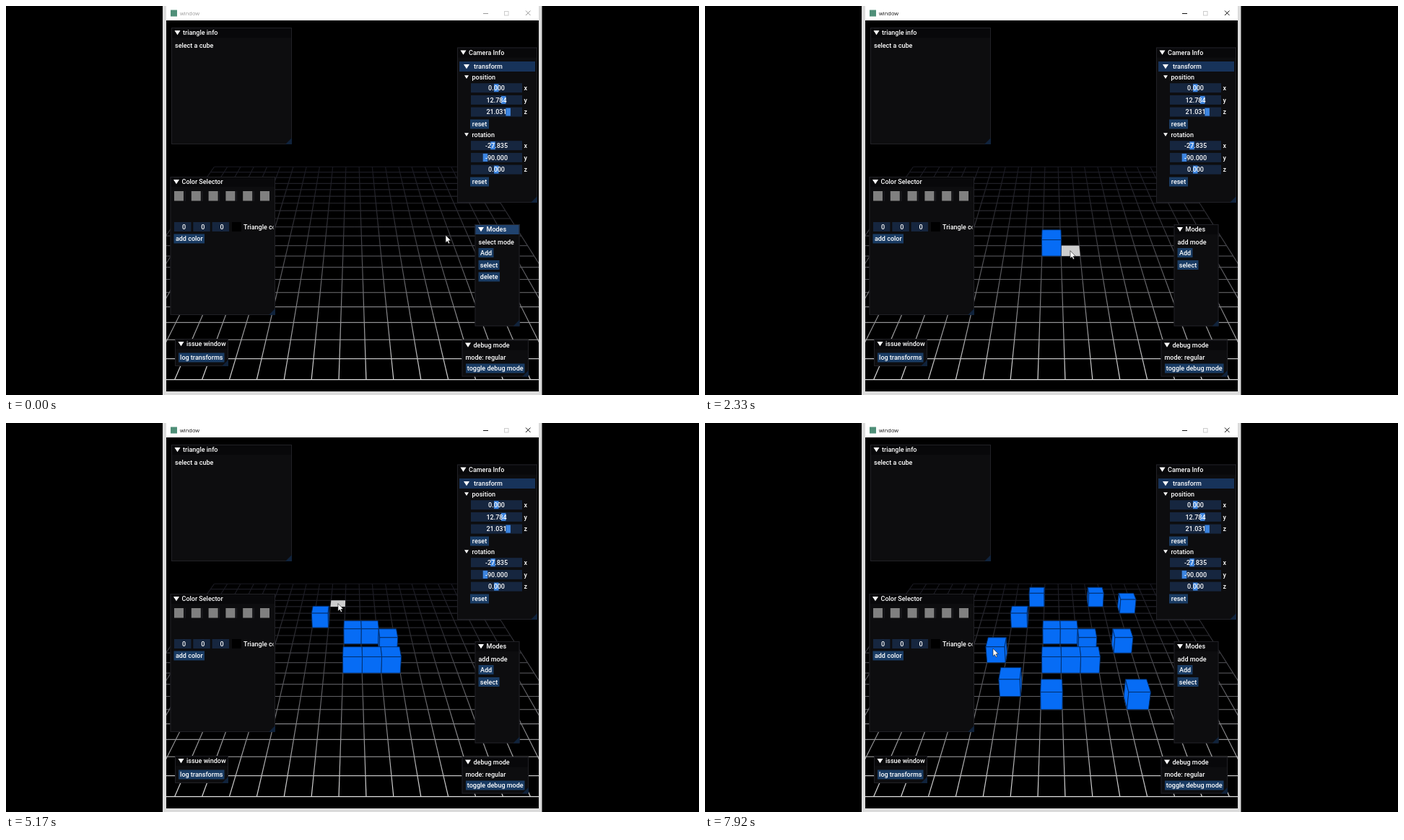
An HTML page with a canvas for the animation above (8 s loop, 960 px wide and 540 px high).

```html
<!DOCTYPE html>
<html lang="en">
<head>
<meta charset="utf-8">
<title>Cube editor</title>
<style>
  html, body { margin: 0; width: 100%; height: 100%; overflow: hidden; background: #000; }
  canvas { display: block; }
</style>
</head>
<body>
<canvas id="stage" width="960" height="540"></canvas>
<script>
const ctx = document.getElementById('stage').getContext('2d');
const LOOP = 8000, STEP = 250 / 3;
const ADD_CLICK = 1080;

const COLOR = {
  text: '#fff', panel: '#0d0d0f', title: '#08080a', activeTitle: '#20436f', border: '#212126',
  grip: '#10233c', field: '#16263f', button: '#1a3c64', hover: '#4296fa', header: '#17335a',
  grab: '#3d85e0', swatch: '#808080', cube: '#066cf5', edge: '#032c66', tile: '#cdcdcd',
};

// Perspective camera, 45 degree field of view
const VIEW = { x: 222, y: 20, w: 516, h: 515 };
const CX = 480, CY = 277.5, FOCAL = VIEW.h / 2 / Math.tan(Math.PI / 8);
const CAM_Y = 12.784, CAM_Z = 21.031, PITCH = 27.835 * Math.PI / 180;
const SIN = Math.sin(PITCH), COS = Math.cos(PITCH);
const GRID_MIN = -10.5, GRID_MAX = 9.5, FLOOR = -0.5;

function project(x, y, z) {
  const g = CAM_Z - z, h = CAM_Y - y, depth = g * COS + h * SIN;
  return [CX + FOCAL * x / depth, CY + FOCAL * (h * COS - g * SIN) / depth];
}

function floorCell([sx, sy]) {
  const v = (sy - CY) / FOCAL;
  const depth = (CAM_Y - FLOOR) / (SIN + v * COS);
  const z = CAM_Z - depth * (COS - v * SIN);
  return [Math.round((sx - CX) * depth / FOCAL), Math.round(z)];
}

// Cubes are placed at a steady pace per run; `hold` is the share of a gap
// that the pointer rests before it leaves for the next cell.
const runs = [
  { start: 1910, gap: 475, hold: 0.45,
    cells: [[0, 1], [1, 1], [2, 1], [2, -1], [1, -2], [0, -2], [-2, -4], [-1, -7]] },
  { start: 5535, gap: 290, hold: 0.2, cells: [[3, -7], [5, -6], [4, -1], [4, 4]] },
  { start: 6910, gap: 420, hold: 0, cells: [[0, 4], [-2, 3], [-3, 0]] },
];
const cubes = runs.flatMap(({ start, gap, hold, cells }) =>
  cells.map(([x, z], i) => ({ x, z, hold, time: start + i * gap })));

const pointerStart = [609, 318];
const moves = [
  { from: 250, to: 750, point: [659, 340] },
  ...cubes.map(({ x, z, hold, time }, i) => {
    const previous = i ? cubes[i - 1].time : ADD_CLICK;
    const at = share => previous + share * (time - previous);
    return { from: at(i ? hold : 0.05), to: at(i ? 0.68 : 0.8), point: project(x, FLOOR, z) };
  }),
  { from: 7770, to: 7900, point: [399, 313] },
];

function pointerAt(t) {
  return moves.reduce(([x, y], { from, to, point }) => {
    const k = Math.min(1, Math.max(0, (t - from) / (to - from)));
    const e = k * k * (3 - 2 * k);
    return [x + (point[0] - x) * e, y + (point[1] - y) * e];
  }, pointerStart);
}

function rect(x, y, w, h, color) {
  ctx.fillStyle = color;
  ctx.fillRect(x, y, w, h);
}

function polygon(points, fill, stroke) {
  ctx.beginPath();
  points.forEach(p => ctx.lineTo(...p));
  ctx.closePath();
  ctx.fillStyle = fill;
  ctx.fill();
  if (stroke) {
    ctx.strokeStyle = stroke;
    ctx.stroke();
  }
}

function line(a, b) {
  ctx.beginPath();
  ctx.moveTo(...a);
  ctx.lineTo(...b);
  ctx.stroke();
}

function text(str, x, yMid, align = 'left') {
  ctx.font = '500 9px Roboto, sans-serif';
  ctx.textAlign = align;
  ctx.fillStyle = COLOR.text;
  ctx.fillText(str, x, yMid + 3.2);
}

function arrow(x, y, r = 4) {
  polygon([[x - r, y - r * 0.75], [x + r, y - r * 0.75], [x, y + r * 0.8]], COLOR.text);
}

function button(label, x, yMid, w, color = COLOR.button) {
  rect(x, yMid - 6.5, w, 13, color);
  text(label, x + w / 2, yMid, 'center');
}

function panel(title, x, y, w, h, active) {
  rect(x, y, w, h, COLOR.panel);
  rect(x, y, w, 14, active ? COLOR.activeTitle : COLOR.title);
  ctx.strokeStyle = COLOR.border;
  ctx.lineWidth = 1;
  ctx.strokeRect(x + 0.5, y + 0.5, w - 1, h - 1);
  polygon([[x + w, y + h - 9], [x + w, y + h], [x + w - 9, y + h]], COLOR.grip);
  arrow(x + 8.5, y + 7);
  text(title, x + 16, y + 7);
}

function drawWindow(active) {
  const ink = active ? '#111' : '#999';
  rect(0, 0, 960, 540, '#000');
  rect(217, 0, 525.5, 540, '#dcdcdc');
  rect(222, 0, 516, 20, '#fff');
  rect(VIEW.x, VIEW.y, VIEW.w, VIEW.h, '#000');
  rect(228, 5.5, 9, 9, '#4f8f78');
  ctx.font = '7.5px "Open Sans", sans-serif';
  ctx.textAlign = 'left';
  ctx.fillStyle = ink;
  ctx.fillText('window', 241, 13);
  ctx.lineWidth = 1;
  ctx.strokeStyle = ink;
  line([661, 10.5], [668, 10.5]);
  line([720, 6.5], [726.5, 13]);
  line([726.5, 6.5], [720, 13]);
  ctx.strokeStyle = '#ccc';
  ctx.strokeRect(690.5, 7.5, 5.5, 5.5);
}

function drawGrid() {
  const fade = ctx.createLinearGradient(0, 222, 0, 520);
  for (let k = 0; k <= 1; k += 0.25) {
    const v = 24 + 200 * k ** 1.6;
    fade.addColorStop(k, `rgb(${v}, ${v}, ${v + 8 * (1 - k)})`);
  }
  ctx.strokeStyle = fade;
  ctx.lineWidth = 1.2;
  for (let i = GRID_MIN; i <= GRID_MAX; i++) {
    line(project(i, FLOOR, GRID_MIN), project(i, FLOOR, GRID_MAX));
    line(project(GRID_MIN, FLOOR, i), project(GRID_MAX, FLOOR, i));
  }
}

function drawTile([x, z]) {
  if (Math.min(x, z) < GRID_MIN || Math.max(x, z) > GRID_MAX) return;
  const corners = [[-0.5, -0.5], [0.5, -0.5], [0.5, 0.5], [-0.5, 0.5]];
  polygon(corners.map(([dx, dz]) => project(x + dx, FLOOR, z + dz)), COLOR.tile);
}

function drawCube({ x, z }) {
  const face = corners => polygon(
    corners.map(([dx, y, dz]) => project(x + dx, y, z + dz)), COLOR.cube, COLOR.edge);
  const l = -0.5, h = 0.5;
  ctx.lineWidth = 0.9;
  ctx.lineJoin = 'round';
  if (x) {
    const s = x > 0 ? l : h;
    face([[s, l, l], [s, h, l], [s, h, h], [s, l, h]]);
  }
  face([[l, h, l], [h, h, l], [h, h, h], [l, h, h]]);
  face([[l, l, h], [h, l, h], [h, h, h], [l, h, h]]);
}

function drawScene(t) {
  ctx.save();
  ctx.beginPath();
  ctx.rect(VIEW.x, VIEW.y, VIEW.w, VIEW.h);
  ctx.clip();
  drawGrid();
  // The highlighted cell trails the pointer by one step
  if (t >= ADD_CLICK) drawTile(floorCell(pointerAt(t - STEP)));
  cubes.filter(c => c.time <= t)
    .sort((a, b) => a.z - b.z || Math.abs(b.x) - Math.abs(a.x))
    .forEach(drawCube);
  ctx.restore();
}

function drawColorSelector() {
  panel('Color Selector', 227.5, 237, 145.5, 192);
  for (let i = 0; i < 6; i++) {
    const x = 233 + i * 23.8;
    rect(x, 257, 13, 13.5, COLOR.swatch);
    if (i < 5) rect(x + 14.5, 257, 1, 14, COLOR.border);
  }
  for (let i = 0; i < 3; i++) {
    const x = 233 + i * 26.3;
    rect(x, 300, 23.5, 13, COLOR.field);
    text('0', x + 13.5, 306.5, 'center');
  }
  rect(313, 300, 13, 13, '#000');
  ctx.save();
  ctx.beginPath();
  ctx.rect(227, 295, 143.5, 25);
  ctx.clip();
  text('Triangle color', 329, 306.5);
  ctx.restore();
  button('add color', 232.5, 323, 42.5);
}

function drawVector(name, y, values, pixelsPerUnit) {
  arrow(638, y - 0.5, 3);
  text(name, 645.5, y);
  values.forEach((value, i) => {
    const row = y + 14.7 + i * 16.7;
    rect(644, row - 6.5, 71, 13, COLOR.field);
    rect(676 + value * pixelsPerUnit, row - 5.5, 6.5, 11, COLOR.grab);
    text(value.toFixed(3), 679.5, row, 'center');
    text('xyz'[i], 717.5, row);
  });
  button('reset', 643, y + 65, 26);
}

function drawCameraInfo() {
  panel('Camera Info', 625, 57.5, 111, 215.5);
  rect(628, 77, 105, 14, COLOR.header);
  arrow(638, 84);
  text('transform', 648, 84);
  drawVector('position', 99, [0, CAM_Y, CAM_Z], 0.78);
  drawVector('rotation', 179, [-27.835, -90, 0], 0.17);
}

function drawModes(t, [px, py]) {
  const adding = t >= ADD_CLICK;
  const hover = px >= 655 && px <= 676 && py >= 336 && py <= 349;
  panel('Modes', 649.5, 303, 62, 141.5, t < cubes[0].time);
  text(adding ? 'add mode' : 'select mode', 654.5, 327.5);
  button('Add', 654.5, 342.5, 21, hover ? COLOR.hover : COLOR.button);
  button('select', 654.5, 359.5, 29);
  if (!adding) button('delete', 654.5, 376, 29.5);
}

function drawPanels(t, pointer) {
  panel('triangle info', 229, 30, 167, 162);
  text('select a cube', 234, 54.5);
  drawColorSelector();
  panel('issue window', 234, 462, 74, 38);
  button('log transforms', 239, 488, 63.5);
  drawCameraInfo();
  drawModes(t, pointer);
  panel('debug mode', 631.5, 463.5, 92.5, 51);
  text('mode: regular', 636.5, 488);
  button('toggle debug mode', 637, 503, 81.5);
}

function drawPointer([x, y]) {
  const outline = [[0, 0], [0, 10.5], [2.4, 8.4], [4, 12], [5.7, 11.2], [4.1, 7.8], [7.2, 7.5]];
  ctx.lineWidth = 0.6;
  polygon(outline.map(([dx, dy]) => [x + dx, y + dy]), '#fff', '#111');
}

function render(now) {
  const t = Math.floor((now % LOOP + 5) / STEP) * STEP;
  const pointer = pointerAt(t);
  drawWindow(t >= ADD_CLICK);
  drawScene(t);
  drawPanels(t, pointer);
  drawPointer(pointer);
}

let start;
function tick(now) {
  start ??= now;
  render(now - start);
  requestAnimationFrame(tick);
}
requestAnimationFrame(tick);
</script>
</body>
</html>
```
